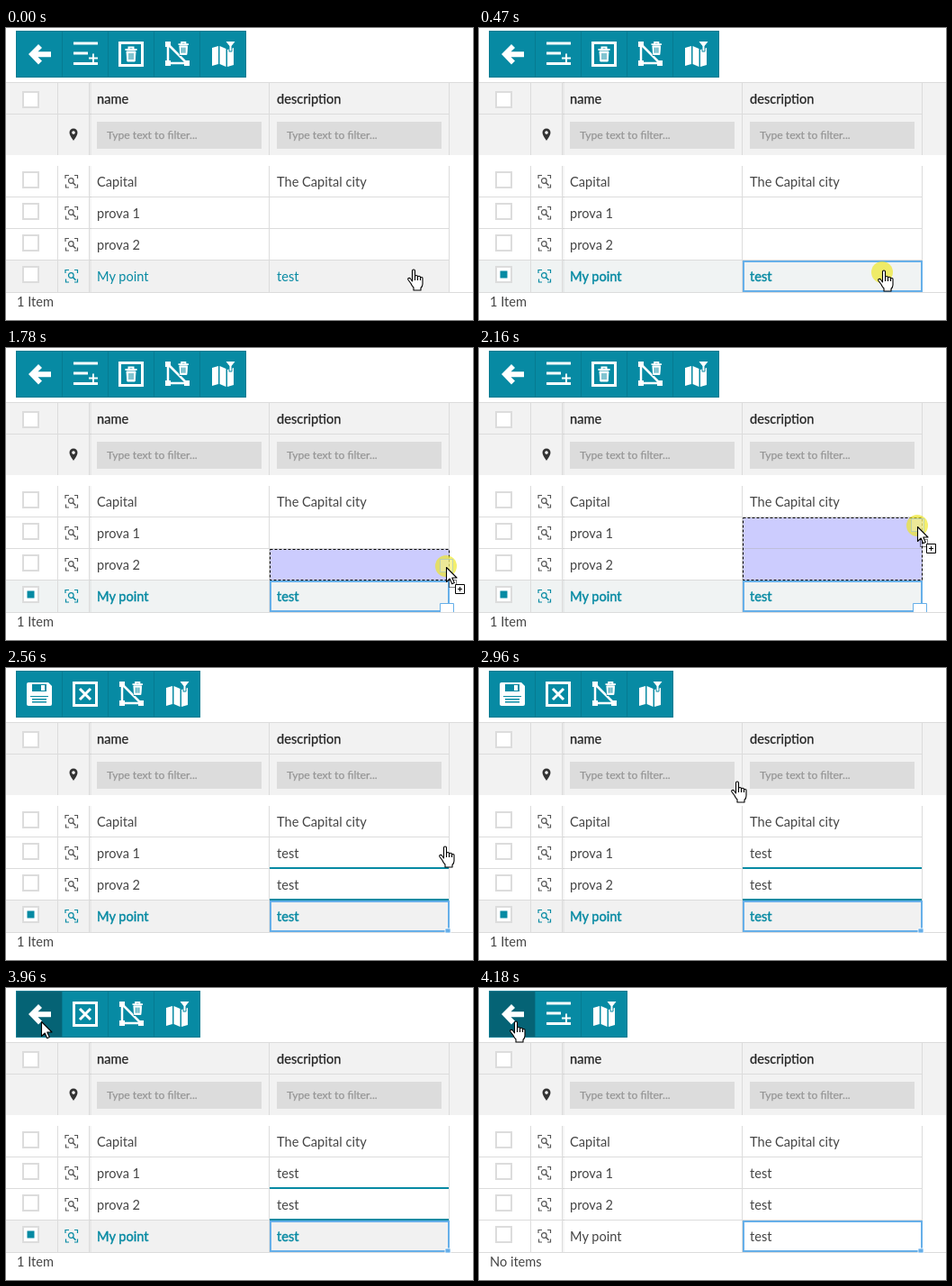
An HTML page for the animation above (5.59 s loop, 519x324 px).

```html
<!DOCTYPE html>
<html lang="en">
<head>
<meta charset="utf-8">
<title>Fill cells by dragging</title>
<style>
html, body { margin: 0; width: 100%; height: 100%; overflow: hidden; background: #fff; }
svg { display: block; width: 519px; height: 324px; }
text { font: 14.6px Lato, "Open Sans", sans-serif; fill: #454545; }
.head { fill: #222; stroke: #222; stroke-width: .25px; }
.hint { font-size: 12.2px; fill: #969696; stroke: #969696; stroke-width: .25px; }
.line { stroke: #dcdcdc; fill: none; }
.box { fill: #fff; stroke: #dcdcdc; stroke-width: 2; }
.teal { fill: #078aa3; }
.bold { stroke: #078aa3; stroke-width: .45px; }
.cursor { fill: #fff; stroke: #000; stroke-width: 1.1; stroke-linejoin: round; }
</style>
</head>
<body>
<svg viewBox="0 0 519 324">
  <defs>
    <g id="back"><path fill="#fff" d="M25 29 36 18l4 4-4.500 4.200H50v6H35.500L40 36.500l-4 4z"/></g>
    <g id="add" stroke="#fff" stroke-width="3.200" fill="none">
      <path d="M24 17h27M24 28h16M24 39.500h27"/><path stroke-width="2" d="M41 33.500h10M46 28.500v10"/>
    </g>
    <g id="bin" fill="none" stroke="#fff">
      <path stroke-width="2" d="M0 3.500h13M4 3V1h5v2"/>
      <path fill="#fff" d="M1.500 5.500h10l-.8 11h-8.400z"/>
      <path stroke="#078aa3" d="M4.500 7.500v7M6.500 7.500v7M8.500 7.500v7"/>
    </g>
    <g id="remove">
      <rect x="24.500" y="16.500" width="25" height="25" fill="none" stroke="#fff" stroke-width="3"/>
      <use href="#bin" x="30.500" y="20.500"/>
    </g>
    <g id="shape">
      <path d="M27 18v21h21L27 18" fill="none" stroke="#fff" stroke-width="2.500"/>
      <path fill="#fff" d="M24 15h6v6h-6zM24 36h6v6h-6zM45 36h6v6h-6z"/>
      <path fill="#078aa3" d="M36 13h16v18H40z"/>
      <use href="#bin" transform="translate(38.500 15) scale(.88)"/>
    </g>
    <g id="map">
      <path fill="#fff" d="m25 22 7-2v20l-7 2zM33.500 20l7 3v20l-7-3zM42 24l7-2v19l-7 2z"/>
      <path fill="#fff" stroke="#078aa3" d="M39.500 14.500h12l-4.500 5.500v6h-3v-6z"/>
    </g>
    <g id="save">
      <path fill="#fff" d="M25 16h22l4 4v20q0 2-2 2H25q-2 0-2-2V18q0-2 2-2z"/>
      <path class="teal" d="M29 18h16v8H29zM27 31h20v9H27z"/>
      <path fill="#fff" d="M39 19h4v6h-4zM27 32h20v8H27z"/>
      <path class="teal" d="M29 34h16v1.500H29zM29 37h16v1.500H29z"/>
    </g>
    <g id="cancel" fill="none" stroke="#fff" stroke-width="3">
      <path d="M24.500 16.500h25v25h-25zM31 23l12 12M43 23 31 35"/>
    </g>
    <g id="zoom" fill="none" stroke="currentColor" stroke-width="1.200">
      <path d="M0 4V.5h4M10 .5h3.500V4M13.500 10.500V14H10M4 14H.5v-3.500"/>
      <circle cx="6.300" cy="6.500" r="2.800"/><path stroke-width="1.600" d="m8.500 8.800 3 3"/>
    </g>
    <g id="hand" class="cursor">
      <path d="M5.500 14V2.500a1.500 1.500 0 0 1 3 0V9q0-1.500 1.500-1.500t1.500 1.500v.5q0-1.200 1.500-1.200t1.500 1.500v.7q0-1 1.300-1t1.200 1.500v6q0 2.500-2 4.500V24H7v-3q-2-2-3-4.500l-3-4q-.8-1.500.5-2t2 .7z"/>
      <path d="M8.500 9v4M11.500 10v3M14.500 11v2"/>
    </g>
    <g id="grab" class="cursor">
      <path d="m5 18.500-3-5-1.500-3q.5-1.500 2-.7L4 11.300 3 5.500q0-2 1.500-1.500l1.200 3-.2-4.500q1.200-2 2.500 0l.7 4V1.700q1.300-2 2.600 0v4.800l1-4q1.500-1.300 2.200.5l-.5 5 .7-2q1.500-.7 1.800 1l-.5 6-1.500 5.500z"/>
      <path d="M5.700 7 6.500 10M8.700 6.500v3M11.300 6.500v3M14 8l-.5 2"/>
    </g>
    <g id="arrow" class="cursor"><path d="M.5.5v16l3.700-3.500 2.500 5.800 2.600-1.200L6.800 12H12z"/></g>
    <g id="drag">
      <path d="M3.500 14.500h8v8h-8z" fill="none" stroke="#000" stroke-dasharray="1 1"/>
      <use href="#arrow"/>
      <path d="M10.500 19.500h10v10h-10z" fill="#fff" stroke="#000"/>
      <path d="M13 24.500h5M15.500 22v5" stroke="#000"/>
    </g>
  </defs>

  <rect width="519" height="324" fill="#fff"/>
  <g id="bar"></g>
  <rect y="60" width="519" height="81" fill="#f2f2f2"/>
  <rect id="rowBg" y="258" width="492" height="35"/>
  <path class="line" d="M0 60.500h519M0 95.500h492M0 187.500h492M0 222.500h492M0 257.500h492M0 293.500h519"/>
  <path class="line" d="M57.500 60v81M92.500 60v81M292.500 60v81M492.500 60v81M57.500 153v140M92.500 153v140M292.500 153v140M492.500 153v140"/>
  <path d="M94 60v81M94 153v140" stroke="#000" stroke-opacity=".04" stroke-width="2"/>
  <rect class="box" x="19" y="71" width="17" height="17"/>
  <path d="M75 125q-4.500-6-4.500-9a4.500 4.500 0 0 1 9 0q0 3-4.500 9zm0-10.800a1.800 1.800 0 1 0 .01 0z" fill="#333"/>
  <text class="head" x="101" y="84">name</text><text class="head" x="301" y="84">description</text>
  <path fill="#dcdcdc" d="M101 104h183v30H101zM301 104h183v30H301z"/>
  <text class="hint" x="112" y="123">Type text to filter...</text><text class="hint" x="312" y="123">Type text to filter...</text>
  <g id="rows"></g>
  <rect id="check" class="teal" x="23.500" y="269.500" width="8" height="8"/>
  <text id="count" x="12" y="309"></text>

  <g id="edited">
    <text x="301" y="211">test</text><text x="301" y="246">test</text>
    <path id="marks" d="M293 222h199M293 257h199" stroke="#078aa3" stroke-width="2"/>
  </g>
  <g id="fill">
    <rect id="area" x="293.500" width="199" fill="#ccccfe" stroke="#000" stroke-dasharray="3 2"/>
    <path id="split" d="M294 222.500h198" stroke="#bfbfdc"/>
  </g>
  <rect id="cell" x="294" y="259" width="198" height="33" fill="none" stroke="#66afe9" stroke-width="2"/>
  <path id="knob" d="M488 289h6v5h-6z" fill="#66afe9" stroke="#fff" stroke-width=".8"/>
  <path id="grip" d="M482.500 293v-9.500h15v9.500" fill="#fff" stroke="#66afe9"/>
  <circle id="click" r="12" fill="#eee61e" fill-opacity=".66"/>
  <rect id="ghost" width="14" height="14" fill="#fff" fill-opacity=".3" stroke="#a9c8c0" stroke-opacity=".7"/>
  <use id="pointer"/>
</svg>
<script>
const LOOP = 5590;
const $ = id => document.getElementById(id);
const set = (id, attrs) => Object.entries(attrs).forEach(([k, v]) => $(id).setAttribute(k, v));
const show = (id, on) => { $(id).style.display = on ? '' : 'none'; };
const latest = (list, t) => list.filter(s => s[0] <= t).pop();

// time, x, y, cursor shape
const moves = [
  [0, 446, 267, 'hand'], [80, 443, 267, 'hand'], [400, 443, 268, 'hand'], [550, 443, 270, 'hand'],
  [860, 448, 271, 'hand'], [930, 461, 274, 'hand'], [1010, 473, 276, 'hand'], [1080, 480, 283, 'grab'],
  [1710, 490, 264, 'drag'], [1780, 489, 243, 'drag'], [1860, 489, 228, 'drag'], [1930, 488, 217, 'drag'],
  [2010, 488, 208, 'drag'], [2080, 487, 201, 'drag'], [2160, 487, 198, 'drag'],
  [2560, 481, 197, 'hand'],
  ...[.12, .45, .8, .97, 1].map((p, i) => [2870 + 80 * i, 481 - 447 * p, 197 - 161 * p, 'hand']),
  [3570, 39, 37, 'arrow'], [4180, 34, 36, 'hand']
];
const bars = [
  [0, 'back add remove shape map'], [2560, 'save cancel shape map'],
  [3960, 'back cancel shape map'], [4180, 'back add map']
];
const tints = [[0, '#078aa3'], [3110, '#056375'], [3340, '#043a44'], [3490, '#056375']];
const clicks = [[320, 550], [1540, 2560], [3340, 3490]];

$('rows').innerHTML = ['Capital', 'prova 1', 'prova 2', 'My point'].map((name, i) => {
  const y = 35 * i, note = ['The Capital city', '', '', 'test'][i];
  return `<g id="row${i}" color="#555"><rect class="box" x="19" y="${160 + y}" width="17" height="17"/>
    <use href="#zoom" x="66" y="${163 + y}"/>
    <text x="101" y="${176 + y}">${name}</text><text x="301" y="${176 + y}">${note}</text></g>`;
}).join('');

let drawn = '';
function drawBar(icons, tint) {
  if (drawn === icons + tint) return;
  drawn = icons + tint;
  $('bar').innerHTML = icons.split(' ').map((icon, i) =>
    `<rect x="${11.5 + 51 * i}" y="3.500" width="51" height="51" fill="${i ? '#078aa3' : tint}" stroke="#067b91"/>
     <use href="#${icon}" x="${51 * i}"/>`).join('');
}

function draw(t) {
  const [, x, y, shape] = latest(moves, t);
  const picked = t >= 400 && t < 4180, dragging = shape === 'drag', saved = t >= 4180;
  drawBar(latest(bars, t)[1], latest(tints, t)[1]);

  set('rowBg', { fill: saved ? '#fff' : picked && t < 2560 ? '#f0f3f3' : '#f1f1f1' });
  set('row3', { color: saved ? '#555' : '#078aa3' });
  document.querySelectorAll('#row3 text').forEach(el =>
    el.setAttribute('class', saved ? '' : picked ? 'teal bold' : 'teal'));
  show('check', picked);
  $('count').textContent = saved ? 'No items' : '1 Item';

  show('cell', t >= 400);
  show('knob', t >= 2560);
  show('edited', t >= 2560);
  show('marks', !saved);

  const top = y < 223 ? 188.5 : 223.5;
  show('fill', dragging && y < 258);
  set('area', { y: top, height: 257.5 - top });
  show('split', top < 200);
  show('grip', dragging);
  show('ghost', dragging);
  set('ghost', { x: x - 6.5, y: y - 8.5 });

  show('click', clicks.some(([a, b]) => t >= a && t < b));
  set('click', shape === 'hand' ? { cx: x + 5, cy: y + 3 }
    : shape === 'grab' ? { cx: 489, cy: 293 } : { cx: x, cy: y - 1 });
  set('pointer', { href: '#' + shape, x: Math.round(x), y: Math.round(y) });
}

const start = performance.now();
function tick() {
  draw((performance.now() - start) % LOOP);
  requestAnimationFrame(tick);
}
tick();
</script>
</body>
</html>
```
